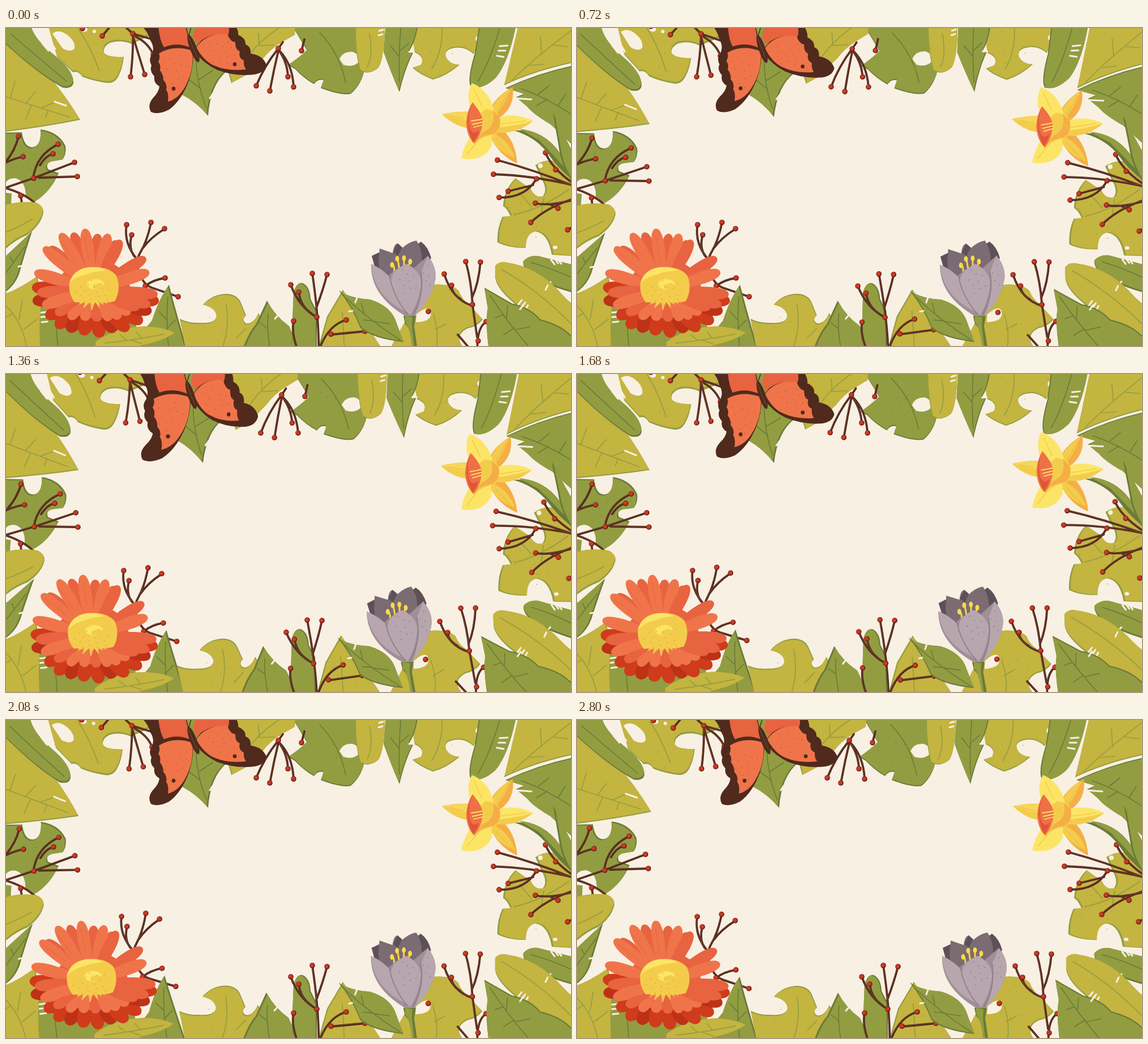
Animation of 998x561 px, one loop 2880 ms. Source, as an HTML page with a canvas:

```html
<!DOCTYPE html>
<html>
<head>
<meta charset="utf-8">
<title>Garden frame</title>
<style>
html, body { margin: 0; width: 100%; height: 100%; overflow: hidden; background: #f8f0e3; }
canvas { display: block; }
</style>
</head>
<body>
<canvas id="stage" width="998" height="561"></canvas>
<script>
const ctx = document.getElementById('stage').getContext('2d');
const LOOP = 2880, STEP = 80;
const CREAM = '#f8f0e3', GOLD = '#c4b440', GREEN = '#929d41', DARK = '#6a7a39', BROWN = '#4f2a1d';
const CORAL = '#f0744a', BRICK = '#e86340', RED = '#cf3b1b';
const SUN = '#fce566', YELLOW = '#f4cc4c', ORANGE = '#f5ae45';

// Each sway leans over around the first time and comes back around the second.
const BEAT = {
  early: [320, 2000], slow: [400, 2350], top: [560, 1740], wing: [210, 1870, 420],
  right: [720, 1850], low: [920, 1940], last: [1330, 2600], flap: [1090, 1520, 300]
};
let now = 0;
const ease = x => { x = Math.min(1, Math.max(0, x)); return x * x * (3 - 2 * x); };
function lean(beat) {
  const [rise, fall, span = 600] = BEAT[beat];
  return ease((now - rise) / span + 0.5) - ease((now - fall) / span + 0.5);
}
function sway(beat, x, y, degrees, draw) {
  ctx.save();
  ctx.translate(x, y);
  ctx.rotate(degrees * Math.PI / 180 * lean(beat));
  ctx.translate(-x, -y);
  draw();
  ctx.restore();
}

const shapes = new Map();
function shape(d) {
  if (!shapes.has(d)) shapes.set(d, new Path2D(d));
  return shapes.get(d);
}
function fill(color, d) { ctx.fillStyle = color; ctx.fill(shape(d)); }
function line(color, width, d) {
  ctx.strokeStyle = color;
  ctx.lineWidth = width;
  ctx.lineCap = ctx.lineJoin = 'round';
  ctx.stroke(shape(d));
}
// A leaf with a darker rim on the side opposite to (dx, dy).
function leaf(color, rim, dx, dy, d) {
  fill(rim, d);
  ctx.save();
  ctx.clip(shape(d));
  ctx.translate(dx, dy);
  fill(color, d);
  ctx.restore();
}
const gold = (dx, dy, d) => leaf(GOLD, GREEN, dx, dy, d);
const green = (dx, dy, d) => leaf(GREEN, DARK, dx, dy, d);
const veins = (color, d) => line(color, 1.6, d);
const cuts = d => line(CREAM, 3, d);
function oval(color, x, y, rx, ry = rx, turn = 0) {
  ctx.fillStyle = color;
  ctx.beginPath();
  ctx.ellipse(x, y, rx, ry, turn, 0, 7);
  ctx.fill();
}
function specks(color, x, y, rx, ry, count) {
  for (let i = 0; i < count; i++) {
    const r = Math.sqrt((i + 0.5) / count);
    oval(color, x + rx * r * Math.cos(i * 2.4), y + ry * r * Math.sin(i * 2.4), 0.8);
  }
}
function twig(d, berries) {
  line(BROWN, 3.8, d);
  ctx.save();
  ctx.translate(-0.7, -0.7);
  line('#84463a', 0.9, d);
  ctx.restore();
  for (const [x, y] of berries) {
    oval('#6b2018', x, y, 4.8);
    oval('#cd3921', x - 0.5, y - 0.4, 3.5);
  }
}
function petal(x, y, tipX, tipY, width, color) {
  const length = Math.hypot(tipX - x, tipY - y);
  ctx.save();
  ctx.translate(x, y);
  ctx.rotate(Math.atan2(tipY - y, tipX - x));
  ctx.beginPath();
  ctx.moveTo(0, 0);
  ctx.bezierCurveTo(length * 0.4, -width * 0.7, length, -width, length, 0);
  ctx.bezierCurveTo(length, width, length * 0.4, width * 0.7, 0, 0);
  ctx.fillStyle = color;
  ctx.fill();
  ctx.restore();
}

function topLeft() {
  sway('early', 150, -100, 2.4, () => {
    gold(-1, -3, 'M70 -20H262V10L222 28Q202 20 184 26Q171 33 173 43Q177 52 208 51Q206 70 200 82Q194 97 181 97Q158 95 135 86Q128 75 118 78L90 50Z');
    fill(CREAM, 'M82 10Q92 2 105 10Q123 22 121 36Q115 44 100 36Z');
    oval(CREAM, 138, 3, 6, 4); oval(CREAM, 156, 6, 3);
    veins(GREEN, 'M128 2Q148 30 165 76');
    specks(GREEN, 160, 60, 22, 25, 7);
  });
  sway('slow', -20, 110, 2.9, () => {
    gold(0, -2, 'M-30 -5L0 26Q40 62 86 97Q110 127 131 162Q72 174 0 183L-30 187Z');
    cuts('M86 130L106 137');
    veins(GREEN, 'M-9 118Q45 136 112 157M36 132L52 112M62 141L84 132M45 136L35 161M74 146L70 158M8 122L16 94');
  });
  sway('slow', -20, -20, 2.4, () => {
    green(-1, -3, 'M-30 -30H38L45 0Q53 22 82 45Q120 74 119 97Q117 108 100 105Q55 80 0 29L-30 0Z');
    cuts('M64 27L75 40M70 23L81 38M76 20L87 37');
    veins(DARK, 'M8 10Q52 48 107 94');
  });
  sway('early', 215, -90, 2.8, () => twig(
    'M200 -12L224 10Q225 45 220 86M224 14L245 82M224 10L266 22M229 15Q252 27 260 47M170 14L190 -10M135 1L139 -10',
    [[220, 86], [245, 82], [224, 10], [170, 14], [135, 1], [260, 47]]));
}

function left() {
  sway('early', -20, 250, 2, () => {
    green(-2, 2, 'M-20 185L28 184Q32 212 48 210Q63 207 61 179Q93 183 105 208Q107 222 100 232L82 235Q69 238 74 249L93 256Q78 290 51 306L35 299Q36 270 17 265Q4 264 0 272H-20Z');
    fill(GREEN, 'M-20 288L10 292L9 312L-20 320Z');
    specks(DARK, 30, 235, 28, 22, 6);
  });
  sway('early', -50, 290, 2.6, () => twig(
    'M-19 288L48 265L121 237M58 264L126 262M48 265Q53 224 92 205M60 242Q70 225 83 222M-18 254Q14 226 22 191M-18 246Q12 230 30 227M-9 280Q30 290 50 308M26 296L28 310',
    [[22, 191], [30, 227], [92, 205], [83, 222], [49, 265], [121, 237], [126, 262], [26, 296]]));
  sway('early', -10, 470, 2, () => {
    green(-3, 0, 'M-20 415L0 402L46 359Q37 386 26 424Q20 450 0 465L-20 475Z');
    cuts('M38 389L43 391M22 421L31 419');
    veins(DARK, 'M0 432L33 386M13 414L8 404');
  });
  sway('early', -20, 370, 2.5, () => {
    gold(-1, -3, 'M-20 317L0 312Q25 305 53 308Q67 314 66 326Q62 347 38 365Q18 373 0 389L-20 402Z');
    veins(GREEN, 'M-9 364Q28 349 46 337');
  });
}

function bottomLeft() {
  sway('last', 40, 640, -1.2, () => {
    green(0, 0, 'M54 466H110L230 515V590H54Z');
    veins(DARK, 'M88 515L92 570');
    gold(-2, 0, 'M-20 476L0 468Q22 461 55 438L65 480Q58 520 64 590H-20Z');
    veins(GREEN, 'M0 490Q30 520 38 570M23 514L29 480M31 532L55 514M12 503L0 510');
    cuts('M62 502L72 501M62 510L74 509M63 519L73 518');
  });
  sway('last', 200, 580, -2.2, () => twig(
    'M222 445Q226 414 243 385Q252 365 256 343M242 388Q255 370 279 355M213 347Q207 380 233 410M222 365Q216 387 226 402M230 410Q236 450 257 458L304 474M246 455Q260 444 281 441',
    [[213, 347], [222, 365], [256, 343], [280, 354], [281, 441], [304, 474], [246, 455]]));
  sway('last', 230, 640, -2.4, () => {
    green(-3, 0, 'M288 453Q298 492 318 561L324 590H195L205 561Q240 540 258 516Q270 478 288 453Z');
    veins(DARK, 'M286 474Q282 515 288 570M283 514L270 500M284 530L299 515');
  });
  sway('last', 180, 700, -0.8, () => {
    gold(0, -1, 'M158 554Q188 531 232 527Q270 524 299 538Q278 553 238 561V580H158Z');
    veins(GREEN, 'M175 556Q230 550 280 540M213 551L201 541M239 547L230 536M222 551L240 557');
  });
  sway('last', 150, 600, -1.7, gerbera);
}

function gerbera() {
  const back = [[46, 457], [47, 482], [70, 510], [88, 528], [110, 536], [136, 542], [166, 546], [192, 537], [216, 534], [241, 520], [257, 501], [270, 482]];
  back.forEach(([x, y], i) => petal(155, 470, x, y, 20, i % 3 == 1 ? '#bd3117' : RED));
  const outer = [[118, 361, BRICK], [162, 363, BRICK], [196, 375, BRICK], [77, 386, BRICK], [96, 362, CORAL],
    [181, 363, CORAL], [203, 374, BRICK], [139, 354, CORAL], [247, 405, BRICK], [66, 387, CORAL],
    [253, 430, CORAL], [50, 431, CORAL], [268, 470, BRICK], [55, 467, BRICK], [64, 490, CORAL], [255, 489, BRICK]];
  oval(BRICK, 155, 460, 64, 52);
  for (const [x, y, color] of outer) petal(155, 462, x, y, 17, color);
  for (const [x, y] of [[139, 368], [97, 377], [72, 395], [242, 410]]) line(BRICK, 1, `M${155 + (x - 155) * 0.55} ${460 + (y - 460) * 0.55}L${x} ${y}`);
  fill(YELLOW, 'M112 449Q119 425 146 422Q180 419 195 437Q206 464 187 490L164 500L129 492Q109 474 112 449Z');
  fill(SUN, 'M112 451Q119 426 147 422Q170 422 176 428Q150 430 144 434Q122 438 112 451Z');
  oval(SUN, 158, 452, 15, 9);
  oval(YELLOW, 164, 456, 11, 5);
  specks('#c98e2e', 155, 466, 34, 23, 20);
  const front = [[87, 504], [111, 513], [220, 503], [236, 493], [137, 516], [202, 512], [162, 518], [184, 516]];
  front.forEach(([x, y], i) => petal(155 + (x - 155) * 0.35, 484, x, y, 14, i % 3 ? CORAL : BRICK));
}

function bottom() {
  sway('low', 330, 650, -2.2, () => {
    gold(-1, 2, 'M307 513Q323 521 342 520Q370 522 372 508Q370 493 348 488Q365 469 390 469Q410 470 416 487L424 507Q415 515 424 521Q437 523 446 503L475 561V590H322Z');
    veins(GREEN, 'M389 488Q396 530 380 570M407 547L424 530');
    specks(GREEN, 375, 532, 34, 25, 8);
  });
  sway('low', 430, 650, -2.3, () => {
    green(3, 1, 'M461 481Q475 508 500 526L515 561V590H408L420 561Q430 535 442 522Q450 504 461 481Z');
    veins(DARK, 'M463 504Q460 530 467 570M461 530L449 520');
    cuts('M475 513L481 506');
  });
  sway('top', 530, 700, -0.8, () => {
    green(-2, 1, 'M503 590L508 467Q513 448 524 450Q537 456 538 478L549 500V590Z');
    gold(2, 1, 'M544 590L567 509L595 462L661 561V590Z');
    veins(GREEN, 'M594 500L598 570');
    specks(GREEN, 609, 535, 24, 20, 6);
  });
  sway('top', 560, 640, -2.5, () => twig(
    'M552 580Q554 520 541 433M548 494Q560 462 567 435M549 510Q517 492 503 453M535 500Q520 488 517 466M518 575Q503 540 508 517M552 570Q568 524 601 515M572 541L634 535',
    [[541, 433], [567, 435], [503, 453], [517, 466], [508, 517], [549, 510], [601, 515], [634, 535], [574, 540]]));
  sway('low', 760, 650, -1.8, () => {
    gold(-1, -2, 'M671 590L681 561L708 512Q742 478 752 453Q787 450 800 464Q804 477 817 487L842 514Q834 526 815 530Q792 542 806 561V590Z');
    fill(CREAM, 'M725 505Q745 488 750 499Q755 518 724 519Z');
    veins(GREEN, 'M755 505Q766 540 759 570M758 532L777 522');
    specks(GREEN, 775, 505, 29, 35, 10);
  });
  sway('low', 700, 610, -1, () => {
    green(1, -2, 'M588 463Q608 477 643 479Q676 489 687 513L702 554Q647 548 626 529Q612 493 588 463Z');
    veins(DARK, 'M600 476Q642 516 696 550M632 502L628 486M651 518L678 522M650 517L631 515');
    cuts('M617 484L620 476M612 499L606 500');
  });
  sway('right', 830, 620, -2.4, () => twig(
    'M824 488Q822 447 812 412M823 476Q835 450 838 413M824 490Q788 479 774 434M803 478Q787 468 787 454M798 541L828 576M833 576Q830 530 848 518M824 488L832 545',
    [[774, 434], [812, 412], [838, 413], [787, 454], [824, 488], [848, 518], [834, 552], [746, 500]]));
  sway('right', 718, 640, -2, crocus);
}

function crocus() {
  fill(DARK, 'M702 508Q712 502 724 508L721 526L726 561V580H718V561Q716 531 705 522Z');
  fill(GREEN, 'M705 508L718 510L717 526L721 561V580H717V561Q713 526 705 519Z');
  fill('#5e5058', 'M646 402L661 395L686 411L733 377Q746 386 751 406L725 450H659Z');
  fill('#7b6b72', 'M658 413L660 389L683 397Q685 381 692 380L700 388Q712 377 725 375Q738 394 734 424L710 451L660 431Z');
  fill('#5e5058', 'M684 395L692 380L700 387L692 402Z');
  line('#f4d44a', 3, 'M684 418Q688 428 684 434M692 407L695 427M703 406L703 425M714 412L709 426');
  for (const [x, y] of [[682, 418], [691, 407], [703, 406], [714, 412]]) oval('#fbdb49', x, y, 3.4, 5);
  fill('#a18f98', 'M645 416Q664 427 676 437Q704 410 712 431L745 402Q760 420 759 440Q754 477 721 508H705Q643 471 645 416Z');
  fill('#b8a6ae', 'M645 416Q669 427 681 444Q690 470 710 502Q649 474 645 416ZM708 416Q733 429 733 451Q730 482 714 507Q681 472 681 441Q685 425 708 416Z');
  fill('#b8a6ae', 'M745 402Q760 423 759 440Q752 480 722 507Q738 475 733 431Z');
  veins('#8c7a84', 'M677 434Q682 471 709 504M733 430Q740 470 719 505');
  specks('#705f68', 708, 447, 18, 25, 9);
  specks('#705f68', 745, 437, 8, 25, 5);
}

function right() {
  sway('top', 1010, 320, -1.8, () => {
    gold(3, -1, 'M935 242Q960 225 998 243H1030V402H998L964 400Q958 362 935 359Q918 362 918 388Q886 388 868 378Q867 354 877 333L891 332Q885 318 878 314Q880 284 900 265L927 284Q934 300 948 297Q958 286 945 264Z');
    oval(CREAM, 944, 243, 4); oval(CREAM, 970, 387, 4, 3);
    veins(GREEN, 'M994 285Q940 322 897 329M928 315L909 293M950 301L945 330');
    specks(GREEN, 924, 335, 43, 38, 13);
  });
  sway('right', 1110, 300, -2.2, () => twig(
    'M1020 286Q946 254 868 233M1005 278Q930 260 861 258M937 266Q917 300 871 299M931 277L887 288M1020 298Q962 316 935 309M1018 296Q956 314 927 343M1008 278Q965 250 953 220M992 356L1016 343M961 311L977 319',
    [[868, 233], [861, 258], [871, 299], [887, 288], [937, 266], [935, 309], [927, 343], [975, 318], [992, 356], [953, 220], [971, 250]]));
  sway('right', 1010, 430, 1.7, () => {
    green(0, -3, 'M914 411Q923 401 939 402L998 417L1030 425V474L998 466Q940 450 919 428Q912 418 914 411Z');
    veins(DARK, 'M928 414Q965 424 1005 443');
    cuts('M963 409L969 417M970 408L975 415M977 411L981 416M956 455L962 448');
  });
  sway('right', 1010, 540, -1.7, () => {
    gold(0, -3, 'M864 420Q872 410 886 414Q935 421 974 461Q991 480 998 485L1030 510V560L998 548Q953 533 908 494Q867 463 864 440Z');
    veins(GREEN, 'M876 426Q946 467 1004 528');
    cuts('M904 489L911 480M911 493L917 484M918 496L922 489M953 462L957 454');
  });
  sway('right', 960, 620, -2.1, () => {
    green(-1, 2, 'M845 458L894 486Q925 492 944 514Q980 523 998 542L1030 560V600H860L854 575Q846 520 851 494Z');
    veins(DARK, 'M855 472Q890 525 932 572M884 513L886 490M901 532L926 527M879 506L864 511M898 529L879 541');
    cuts('M908 496L914 488');
  });
}

function topRight() {
  sway('top', 580, -120, -1.3, () => {
    green(0, -2, 'M508 -20V0L498 65L510 72Q526 89 544 99Q551 89 561 92L556 106Q593 120 609 116Q629 99 634 70L640 0V-20ZM508 0L531 39Q518 52 498 65Z');
    fill(CREAM, 'M589 55Q595 41 612 42Q627 47 622 61Q612 70 596 65Z');
    fill(CREAM, 'M506 18L531 39Q518 52 498 65Z');
    veins(DARK, 'M554 8Q590 45 600 97');
    specks(DARK, 562, 56, 24, 30, 9);
  });
  sway('top', 640, -200, -1, () => {
    gold(1, -1, 'M617 -20H669V0Q668 53 658 70Q640 85 625 74Q617 45 617 0Z');
    veins(GREEN, 'M642 10Q649 48 638 69');
    cuts('M659 5L666 3M658 13L665 11');
  });
  sway('top', 770, -80, -1.9, () => {
    gold(0, -2, 'M712 -20H850V0L826 46Q811 32 793 35Q773 38 777 51Q783 64 801 65Q778 85 754 91Q729 81 718 70L733 65Q741 51 722 43Z');
    oval(CREAM, 834, 19, 5);
    veins(GREEN, 'M770 -9Q773 39 752 72');
    specks(GREEN, 760, 33, 31, 35, 9);
  });
  sway('top', 690, -90, -2.3, () => {
    green(-2, 0, 'M672 -20H729L727 0Q722 27 712 41L719 44Q705 71 695 113Q679 76 667 42Z');
    veins(DARK, 'M698 -9Q693 50 695 96M695 41L711 27M695 51L679 31');
    cuts('M712 42L720 42');
  });
  sway('top', 870, -80, -1.9, () => {
    green(2, 0, 'M838 -20H905L900 0Q887 61 865 88Q841 110 821 104Q814 91 828 45Z');
    veins(DARK, 'M875 -9Q855 59 834 94');
    cuts('M872 32L886 31M870 40L882 40M867 49L879 51');
  });
  sway('top', 1060, -20, -2, () => {
    gold(0, -2, 'M908 -20H1030V51L998 62Q930 77 880 101Q890 60 904 0Z');
    veins(GREEN, 'M1004 0Q933 53 895 91M946 47L944 15M925 66L950 64M967 30L992 33');
  });
  sway('top', 1060, 40, -1.2, () => {
    green(-1, 2, 'M882 106Q938 80 998 67L1030 60V232L998 204L962 170Q930 151 921 139L901 122L915 116Z');
    veins(DARK, 'M910 107Q958 124 1004 156M940 117L959 102M956 126L937 137M975 137L988 117');
    cuts('M900 124L928 126');
  });
  sway('top', 1100, 235, -1.7, daffodil);
}

function daffodil() {
  fill(DARK, 'M898 181Q947 176 978 220L998 248L1020 260V280L998 266Q974 246 956 220Q936 193 898 181Z');
  fill(GREEN, 'M907 178Q945 181 970 211Q985 225 998 252L995 256Q964 221 942 198Z');
  green(3, 0, 'M966 150Q985 188 998 213L1020 235V280L998 268Q980 241 976 207Z');
  fill(ORANGE, 'M853 149Q860 124 895 104Q900 139 871 159Z');
  fill(YELLOW, 'M854 149Q866 121 892 107Q878 141 860 158Z');
  fill(ORANGE, 'M855 165Q899 184 903 239Q870 225 853 187Z');
  fill(YELLOW, 'M860 185Q889 198 899 230Q870 219 853 191Z');
  fill(YELLOW, 'M830 177Q797 179 770 152Q802 145 833 149Z');
  fill('#f7d757', 'M770 152Q803 146 831 151L815 164Z');
  fill(SUN, 'M820 142Q812 116 823 97Q854 110 862 146L851 156Z');
  fill(SUN, 'M857 161Q897 146 931 164Q900 190 861 179Z');
  fill(YELLOW, 'M860 176Q896 174 931 164Q899 190 863 183Z');
  fill(SUN, 'M826 183Q808 207 804 230Q843 237 858 208V181Z');
  veins(YELLOW, 'M827 108L841 139M814 223L839 193M917 164L870 170');
  line('#eeb23f', 1, 'M783 154L809 160M888 114L867 147M894 228L866 197');
  fill(YELLOW, 'M824 131Q841 143 867 147Q879 166 867 186Q844 190 827 204Z');
  fill(ORANGE, 'M860 146L872 157Q876 179 860 187Q834 191 827 203L842 184Q866 174 860 146Z');
  fill(SUN, 'M824 131Q836 139 849 142L837 151Z');
  fill('#ef7047', 'M824 131Q843 153 842 167Q840 188 827 204Q813 190 813 165Q815 144 824 131Z');
  fill('#df5538', 'M824 132Q807 164 825 201Q836 188 835 180Q825 191 819 176Q815 151 824 132Z');
  line(SUN, 1.8, 'M822 164L841 161M824 170L842 166M826 175L842 171');
}

function topMiddle() {
  sway('top', 450, -150, -1.8, () => {
    gold(2, 0, 'M376 -20H512L510 12L487 25Q466 38 454 54Q440 66 430 80L398 97L389 65Z');
    veins(GREEN, 'M482 0Q434 31 408 80M447 30L446 8M447 31L474 30');
  });
  sway('top', 510, -150, -1.8, () => twig(
    'M481 36Q456 67 442 102M482 36Q473 73 466 111M481 38Q497 60 498 86M483 40Q506 64 508 104M481 36L489 25M527 20L522 40',
    [[442, 102], [466, 111], [498, 86], [508, 104], [481, 36], [522, 40]]));
  sway('wing', 305, -68, 2.3, () => {
    green(-3, 0, 'M295 -20H345L390 76Q361 100 357 155Q337 131 310 117L306 85Z');
    veins(DARK, 'M335 45Q336 97 354 141M341 91L365 75M344 107L323 91');
    cuts('M365 116L360 124');
    butterfly();
  });
}

function wing(scaleX, scaleY, draw) {
  const flap = lean('flap');
  ctx.save();
  ctx.translate(330, 34);
  ctx.scale(1 + scaleX * flap, 1 + scaleY * flap);
  ctx.translate(-330, -34);
  draw();
  ctx.restore();
}

function butterfly() {
  wing(0.08, 0.05, () => {
    fill(BROWN, 'M236 -20H285L330 36Q333 63 323 93Q310 128 288 144Q268 154 256 148Q249 136 260 123Q270 113 271 103Q260 97 262 85Q253 76 257 66Q251 56 258 46Q263 34 255 22Q251 8 243 0Z');
    fill(BRICK, 'M268 -20H308L329 28L327 35Q302 24 279 34Q269 18 268 -20Z');
    fill(CORAL, 'M329 40Q333 75 315 106Q304 125 286 130Q288 116 283 109Q285 98 278 92Q278 81 272 75Q274 65 269 60Q273 51 270 45Q296 29 329 40Z');
    specks('#b94c32', 297, 76, 23, 35, 15);
    oval(BROWN, 296, 107, 3.4);
  });
  wing(-0.07, 0.12, () => {
    fill(BROWN, 'M333 36L380 -20H395Q412 2 410 12Q424 18 423 29Q433 32 432 45Q454 48 460 65Q457 79 439 82Q405 86 373 74Q350 63 336 45Z');
    fill(BRICK, 'M330 15Q333 -2 345 -20H386Q399 2 391 15Q366 4 337 28Z');
    fill(CORAL, 'M336 34Q356 7 391 11Q397 25 405 25Q405 39 413 41Q410 53 420 57Q419 66 424 73Q392 77 367 66Q349 58 336 34Z');
    specks('#b94c32', 382, 42, 30, 23, 15);
    oval(BROWN, 404, 64, 3.4);
  });
  line(BROWN, 1.5, 'M322 14L316 -9M323 13L329 -8');
  oval(BROWN, 331, 36, 6, 26, -0.36);
  line('#74503b', 1, 'M322 15Q328 31 338 52');
}

function draw() {
  now = Math.floor(performance.now() % LOOP / STEP) * STEP;
  ctx.fillStyle = CREAM;
  ctx.fillRect(0, 0, 998, 561);
  topLeft();
  left();
  bottomLeft();
  bottom();
  right();
  topRight();
  topMiddle();
  requestAnimationFrame(draw);
}
draw();
</script>
</body>
</html>
```
